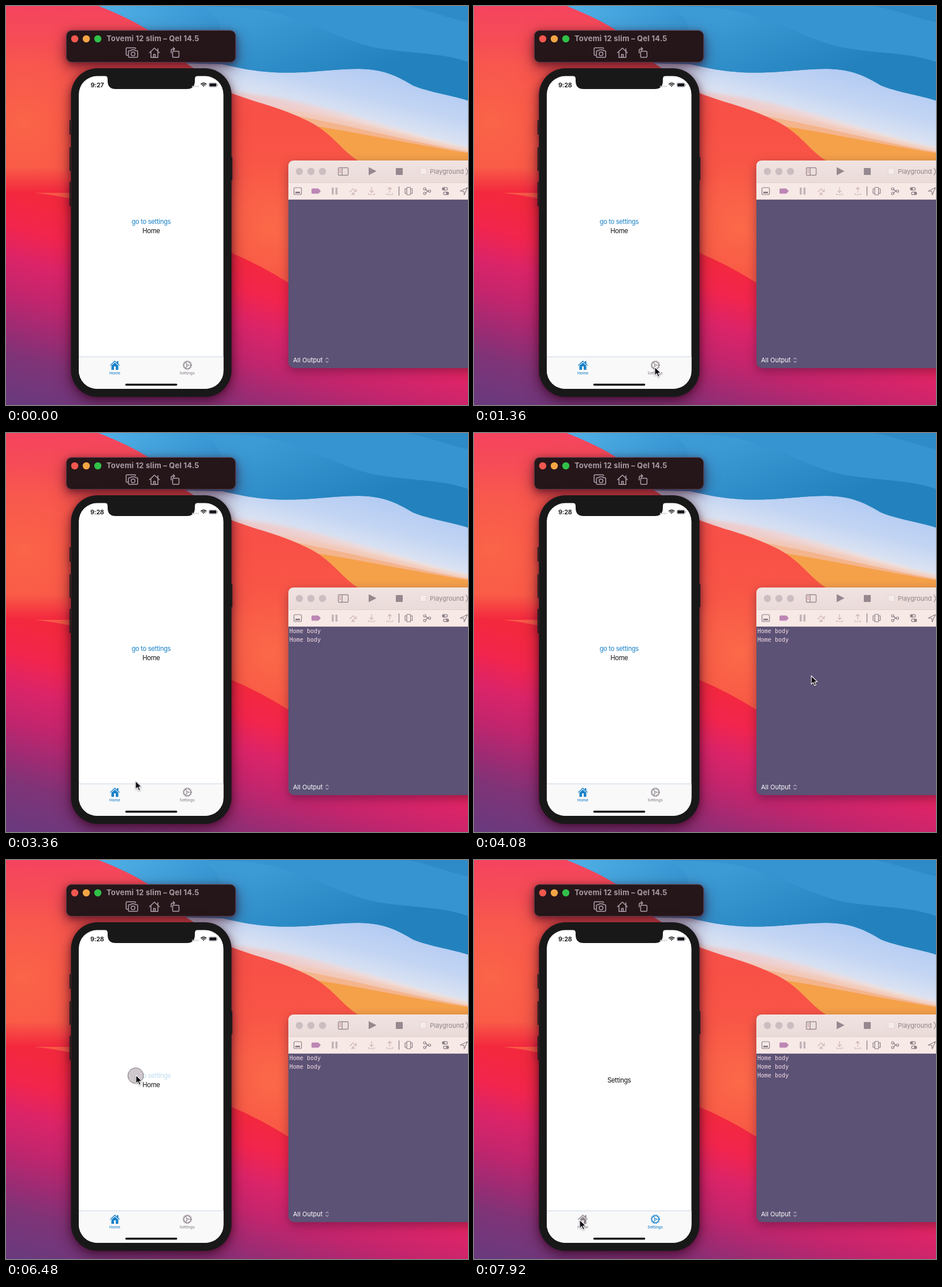
An HTML page that plays this animation: 800x692 px, repeating every 8 s.

```html
<!DOCTYPE html>
<html lang="en">
<head>
<meta charset="utf-8">
<title>Tab demo</title>
<style>
html, body { margin: 0; width: 100%; height: 100%; overflow: hidden; background: #f5454f; }
svg { display: block; width: 800px; height: 692px; }
text { font-family: Inter, "Open Sans", sans-serif; }
.mono { font: 10px "DejaVu Sans Mono", monospace; fill: #f6dbe5; }
.body { font-size: 11.3px; letter-spacing: -.35px; text-anchor: middle; fill: #111; }
.label { font-size: 6.7px; font-weight: 500; text-anchor: middle; fill: currentColor; }
.clock { font-size: 11px; font-weight: 600; letter-spacing: -.2px; fill: #111; }
.on { color: #1b82c9; }
.off { color: #8f868c; }
.on .label { font-weight: 600; }
.line { fill: none; stroke: currentColor; stroke-linecap: round; stroke-linejoin: round; }
.deep { filter: drop-shadow(0 3px 6px rgba(50, 0, 25, .45)) drop-shadow(0 8px 13px rgba(50, 0, 25, .5)); }
.soft { filter: drop-shadow(0 6px 9px rgba(40, 10, 40, .4)); }
.blur { filter: blur(3px); }

/* 1% is 80 ms */
.step { animation: 8s step-end infinite; }
.early { animation-name: early; }
.late { animation-name: late; }
.home { animation-name: home; }
.settings { animation-name: settings; }
.log1 { animation-name: log1; }
.log2 { animation-name: log2; }
.log3 { animation-name: log3; }
.touch { animation-name: touch; }
.link { animation-name: link; }
.cursor { animation: move 8s ease-in-out infinite; }

@keyframes early { 0% { opacity: 1 } 7%, 100% { opacity: 0 } }
@keyframes late { 0% { opacity: 0 } 7%, 100% { opacity: 1 } }
@keyframes home { 0%, 38% { opacity: 1 } 20%, 83%, 100% { opacity: 0 } }
@keyframes settings { 0%, 38% { opacity: 0 } 20%, 83%, 100% { opacity: 1 } }
@keyframes log1 { 0% { opacity: 0 } 20%, 100% { opacity: 1 } }
@keyframes log2 { 0% { opacity: 0 } 38%, 100% { opacity: 1 } }
@keyframes log3 { 0% { opacity: 0 } 83%, 100% { opacity: 1 } }
@keyframes touch { 0%, 20%, 38%, 83%, 100% { opacity: 0 } 18%, 36%, 80% { opacity: 1 } }
@keyframes link { 0%, 83%, 100% { opacity: 1 } 80% { opacity: .28 } }
@keyframes move {
  0%, 9% { transform: translate(470px, 705px) }
  15%, 25% { transform: translate(313px, 626px) }
  25% { animation-timing-function: ease-in }
  31% { transform: translate(212px, 625px); animation-timing-function: ease-out }
  34%, 40% { transform: translate(183px, 624px) }
  49%, 60% { transform: translate(584px, 421px) }
  67% { transform: translate(265px, 416px) }
  72%, 87% { transform: translate(225px, 373px) }
  95%, 100% { transform: translate(183px, 624px) }
}
</style>
</head>
<body>
<svg viewBox="0 0 800 692">
<defs>
  <linearGradient id="warm" x1="0" y1="0" x2="0" y2="1">
    <stop offset="0" stop-color="#f5445f"/>
    <stop offset=".15" stop-color="#f7534f"/>
    <stop offset=".28" stop-color="#f85046"/>
    <stop offset=".5" stop-color="#f95a47"/>
    <stop offset="1" stop-color="#f8503f"/>
  </linearGradient>
  <radialGradient id="glow">
    <stop offset="0" stop-color="#fd7a4b" stop-opacity=".5"/>
    <stop offset="1" stop-color="#fb6c4a" stop-opacity="0"/>
  </radialGradient>
  <linearGradient id="fade" x1="0" y1="0" x2="0" y2="1">
    <stop offset="0" stop-color="#f3283e" stop-opacity="0"/>
    <stop offset="1" stop-color="#f3283e"/>
  </linearGradient>
  <linearGradient id="dusk" gradientUnits="userSpaceOnUse" x1="0" y1="322" x2="-96" y2="665">
    <stop offset="0" stop-color="#f3283e"/>
    <stop offset=".15" stop-color="#f2254c"/>
    <stop offset=".3" stop-color="#dc2468"/>
    <stop offset=".47" stop-color="#c2256d"/>
    <stop offset=".62" stop-color="#9f2b73"/>
    <stop offset=".76" stop-color="#7f3377"/>
    <stop offset="1" stop-color="#683a7e"/>
  </linearGradient>
  <linearGradient id="sky" gradientUnits="userSpaceOnUse" x1="180" y1="0" x2="430" y2="120">
    <stop offset="0" stop-color="#4eade4"/>
    <stop offset=".5" stop-color="#3c9bd6"/>
    <stop offset="1" stop-color="#2c8ac6"/>
  </linearGradient>
  <linearGradient id="sea" gradientUnits="userSpaceOnUse" x1="480" y1="0" x2="540" y2="150">
    <stop offset="0" stop-color="#3c9ad5"/>
    <stop offset="1" stop-color="#2382bd"/>
  </linearGradient>
  <linearGradient id="mist" gradientUnits="userSpaceOnUse" x1="620" y1="105" x2="590" y2="225">
    <stop offset="0" stop-color="#b3cbf3"/>
    <stop offset=".4" stop-color="#c3d5f3"/>
    <stop offset="1" stop-color="#eeeef2"/>
  </linearGradient>
  <linearGradient id="peach" gradientUnits="userSpaceOnUse" x1="420" y1="0" x2="740" y2="0">
    <stop offset="0" stop-color="#ecc9cb"/>
    <stop offset="1" stop-color="#f1e3df"/>
  </linearGradient>
  <linearGradient id="title" x1="0" y1="0" x2="0" y2="1">
    <stop offset="0" stop-color="#f0e3e1"/>
    <stop offset="1" stop-color="#eadbd9"/>
  </linearGradient>
  <clipPath id="screen"><rect x="126" y="121" width="251" height="543" rx="32"/></clipPath>
  <g id="house">
    <path d="M-8.5 0 0-8l3.5 3.3V-7H6v4.6L8.5 0 7.700 1 0-6-7.700 1Z" fill="currentColor"/>
    <path d="M-6 .8 0-4.600 6 .8V8H1.500V2h-3v6H-6Z" fill="currentColor"/>
  </g>
  <g id="gear" class="line">
    <circle r="7.1" stroke-width="1.7" stroke-dasharray="1.6 1.25" stroke-linecap="butt"/>
    <circle r="6" stroke-width="1.1"/>
    <circle r="1.6" stroke-width="1"/>
    <path d="M1.6 0H6M-.8-1.4-3-5.2M-.8 1.4-3 5.2" stroke-width="1.1"/>
  </g>
  <g id="homeTab"><use href="#house" x="188.5" y="623"/><text class="label" x="188.5" y="638.5">Home</text></g>
  <g id="settingsTab"><use href="#gear" x="314" y="623"/><text class="label" x="313.7" y="638.5">Settings</text></g>
</defs>

<!-- wallpaper -->
<rect width="800" height="300" fill="url(#mist)"/>
<path class="blur" d="M380 148C520 158 640 207 810 249V270H620L380 180Z" fill="url(#peach)"/>
<path class="blur" d="M460 176C560 186 660 218 810 251V290H620L460 190Z" fill="#f3c5b0" opacity=".8"/>
<path d="M490 188C590 206 690 233 800 253V290H600Z" fill="#f6b083" opacity=".8"/>
<path d="M515 205C620 221 710 241 800 255V290H600Z" fill="#f5a14a"/>
<path d="M100 0H800V164C765 153 735 150 705 138C680 123 655 109 610 109C565 109 520 118 462 115C430 113 405 108 375 101L250 98Z" fill="url(#sky)"/>
<path d="M335 0C390 3 425 0 470 12C540 32 590 65 650 74C710 83 755 81 800 97V164C765 153 735 150 705 138C680 123 655 109 610 109C565 109 520 118 462 115C430 113 405 108 375 101L300 90C370 80 400 30 335 0Z" fill="url(#sea)"/>
<path d="M335 0C390 3 425 0 470 12C540 32 590 65 650 74C710 83 755 81 800 97V28C765 20 735 8 700 0Z" fill="#3694d0"/>
<path d="M690 0C730 5 765 22 800 28V0Z" fill="#2f8bc8"/>
<path d="M0 0H160C215 22 265 45 310 98L390 151C440 170 470 174 520 198C572 222 585 262 625 275L800 400V692H0Z" fill="url(#warm)"/>
<ellipse cx="30" cy="200" rx="170" ry="140" fill="url(#glow)"/>
<ellipse cx="460" cy="385" rx="110" ry="120" fill="url(#glow)"/>
<rect y="280" width="250" height="44" fill="url(#fade)"/>
<path d="M0 322C120 320 260 375 390 428Q440 449 489 480L800 610V692H0Z" fill="url(#dusk)"/>

<!-- control bar -->
<g class="deep">
  <rect x="104.5" y="42.5" width="293" height="55" rx="9" fill="#25161a" stroke="#5b3d45"/>
</g>
<circle cx="119" cy="57" r="6.2" fill="#f2574f"/>
<circle cx="139" cy="57" r="6.2" fill="#f3a545"/>
<circle cx="159" cy="57" r="6.2" fill="#31c148"/>
<text x="174" y="61" font-size="13" font-weight="700" fill="#a99aa3" letter-spacing=".2">Tovemi 12 slim – Qel 14.5</text>
<g class="line" color="#b0a2ad" stroke-width="1.5">
  <path d="M211 85.5h-1.5q-1.5 0-1.5-1.5V74q0-1.5 1.5-1.5H223q1.5 0 1.5 1.5"/>
  <path d="M213.5 77.5h2.5l1.3-1.5h5.4l1.3 1.5h2.5q1.5 0 1.5 1.5v8.5q0 1.5-1.5 1.5h-13q-1.5 0-1.5-1.5V79q0-1.5 1.5-1.5Z"/>
  <circle cx="220" cy="83" r="3.3"/>
  <path d="M248.5 81 257 73l8.5 8M251 80v9.2h12V80M263 74v3.5M255.5 89v-5h3v5"/>
  <rect x="288.5" y="78.5" width="11" height="10.5" rx="1.5"/>
  <path d="M286 81.5v-4q0-3 3-3h2.5M289.700 72l2.300 2.500-2.300 2.500"/>
</g>

<!-- phone -->
<g class="deep">
  <path d="M112 198h-2v25h2ZM112 245h-2v41h2ZM112 305h-2v42h2ZM390 262h2v40h-2Z" fill="#241c20"/>
  <rect x="112.5" y="108" width="278" height="570" rx="46" fill="#191819"/>
</g>
<rect x="126" y="121.5" width="250.5" height="542.5" rx="32" fill="#fff"/>
<path d="M171 121h161q-5 0-5 6v3q0 14-14 14H190q-14 0-14-14v-3q0-6-5-6Z" fill="#191819"/>
<g clip-path="url(#screen)">
  <rect x="126" y="608" width="250.5" height="56" fill="#f9f9fa"/>
  <path d="M126 608.5H376.5" stroke="#c9d6e3"/>
</g>
<rect x="206.5" y="655" width="90" height="3.6" rx="1.8" fill="#111"/>
<text class="clock step early" x="146.5" y="140.5">9:27</text>
<text class="clock step late" x="146" y="140.5">9:28</text>
<path d="M322 139.5h12" stroke="#c3c1c4" stroke-width="1.8" stroke-dasharray="2 1.2"/>
<g class="line" color="#111" stroke-width="1.5" stroke-linecap="butt">
  <path d="M337.8 135.4q4.4-3.8 8.8 0M339.6 137.3q2.6-2.2 5.2 0"/>
</g>
<path d="M340.8 138.5q1.4-1 2.8 0l-1.4 1.7Z" fill="#111"/>
<rect x="351.3" y="133.2" width="14" height="7.4" rx="2.2" fill="#fff" stroke="#99959b" stroke-width=".7"/>
<rect x="352.3" y="134.2" width="12" height="5.4" rx="1.3" fill="#15111a"/>
<path d="M366.5 135.7v2.4" stroke="#99959b"/>

<g class="step home">
  <text class="body step link" x="251.3" y="378" style="fill:#1b82c9">go to settings</text>
  <text class="body" x="251.3" y="393.5">Home</text>
  <use class="on" href="#homeTab"/>
  <use class="off" href="#settingsTab"/>
</g>
<g class="step settings">
  <text class="body" x="251.3" y="385.5">Settings</text>
  <use class="off" href="#homeTab"/>
  <use class="on" href="#settingsTab"/>
</g>

<!-- console window -->
<g class="soft">
  <rect x="489" y="268" width="340" height="360" rx="10" fill="#5b5275"/>
</g>
<path d="M489 306V278q0-10 10-10H800v38Z" fill="url(#title)"/>
<rect x="489" y="306" width="311" height="29.5" fill="#f7e9e6"/>
<path d="M489 306.5H800" stroke="#dfcfcd"/>
<path d="M489 335.5H800" stroke="#d5c3c6"/>
<path d="M489.5 336V278q0-9.5 9.5-9.5H800" fill="none" stroke="#f7eeec" opacity=".8"/>
<g fill="#cbbec1">
  <circle cx="508" cy="287" r="6.2"/>
  <circle cx="528" cy="287" r="6.2"/>
  <circle cx="548" cy="287" r="6.2"/>
</g>
<g class="line" color="#988a8f" stroke-width="1.4">
  <rect x="575.5" y="280.5" width="17" height="13" rx="1.5"/>
  <path d="M582 281v12"/>
  <path d="M577.7 283.5h2M577.7 286h2M577.7 288.5h2" stroke="#c9787e" stroke-width="1"/>
  <path d="M796.5 281l3.5 6-3.5 6" stroke-width="1.2"/>
</g>
<path d="M628 279.5 641.5 286.5 628 293.5Z" fill="#95888e"/>
<rect x="675" y="281" width="12" height="12" rx="1" fill="#95888e"/>
<rect x="717" y="281" width="11" height="11" rx="2.5" fill="#f5ebe9" stroke="#dccdcd" stroke-width=".8"/>
<text x="734" y="290.5" font-size="11" fill="#8f8388">Playground</text>

<g class="line" color="#8c8088" stroke-width="1.2">
  <rect x="498.6" y="315" width="13" height="12" rx="2"/>
  <path d="M501 323.5h8" stroke-width="3" stroke-linecap="butt"/>
  <path d="M680.5 313.5v15" stroke="#85777e"/>
  <rect x="694" y="314.5" width="6.5" height="13" rx="1"/>
  <path d="M693.5 317h-2.5v8h2.5M701 317h2.5v8H701"/>
  <circle cx="725" cy="317" r="2"/>
  <circle cx="725" cy="325" r="2"/>
  <circle cx="733.5" cy="321" r="2"/>
  <path d="M727 317.5q1 3 4.5 3.5-3.5.5-4.5 3.5"/>
  <rect x="755.5" y="314.8" width="9" height="4.6" rx="2.3"/>
  <rect x="757.5" y="322.6" width="9" height="4.6" rx="2.3"/>
  <circle cx="758" cy="317.1" r="1.5" fill="currentColor"/>
  <circle cx="764" cy="324.9" r="1.5" fill="currentColor"/>
  <path d="M786.5 321 799 315l-5.5 12.5-.8-6.2Z"/>
</g>
<path d="M530.5 316.500h9.500q1 0 1.700.8l3.300 3.700-3.300 3.700q-.7.8-1.700.8h-9.500q-1.500 0-1.500-1.500v-6q0-1.500 1.500-1.500Z" fill="#bd86b5"/>
<path d="M564 315h3.5v12H564ZM570.5 315h3.5v12h-3.5Z" fill="#c2b2b7"/>
<g class="line" color="#cfb5b9" stroke-width="1.2">
  <path d="M595.5 322.5 601 317l5 4.5M606.5 317.5v4.5H602M598.5 327h5l-2.5-3Z"/>
  <path d="M633 314.5v8.5M630 320.5l3 3 3-3M628 325v2h10v-2"/>
  <path d="M664.5 323.5V315M661.5 317.5l3-3 3 3M659.5 325v2h10v-2"/>
</g>

<text class="mono step log1" x="490.8" y="347">Home body</text>
<text class="mono step log2" x="490.8" y="362">Home body</text>
<text class="mono step log3" x="490.8" y="377">Home body</text>
<text x="497" y="618" font-size="11" fill="#fff">All Output</text>
<path class="line" color="#e8e2ec" stroke-width="1" d="M553.8 612.5l2.2-2.3 2.2 2.3M553.8 616l2.2 2.3 2.2-2.3"/>

<!-- pointer -->
<g class="cursor">
  <circle class="step touch" cx="-.5" cy="1" r="13.5" fill="#cbc2c8" fill-opacity=".9" stroke="#77707a"/>
  <path d="M0 0V14.8L3.4 11.7 5.8 17.2 8.3 16.1 6 10.7 10.5 10.4Z" fill="#120c14" stroke="#fff" stroke-width="1.1" stroke-linejoin="round" style="filter:drop-shadow(0 1px 1px rgba(0,0,0,.35))"/>
</g>
</svg>
</body>
</html>
```
